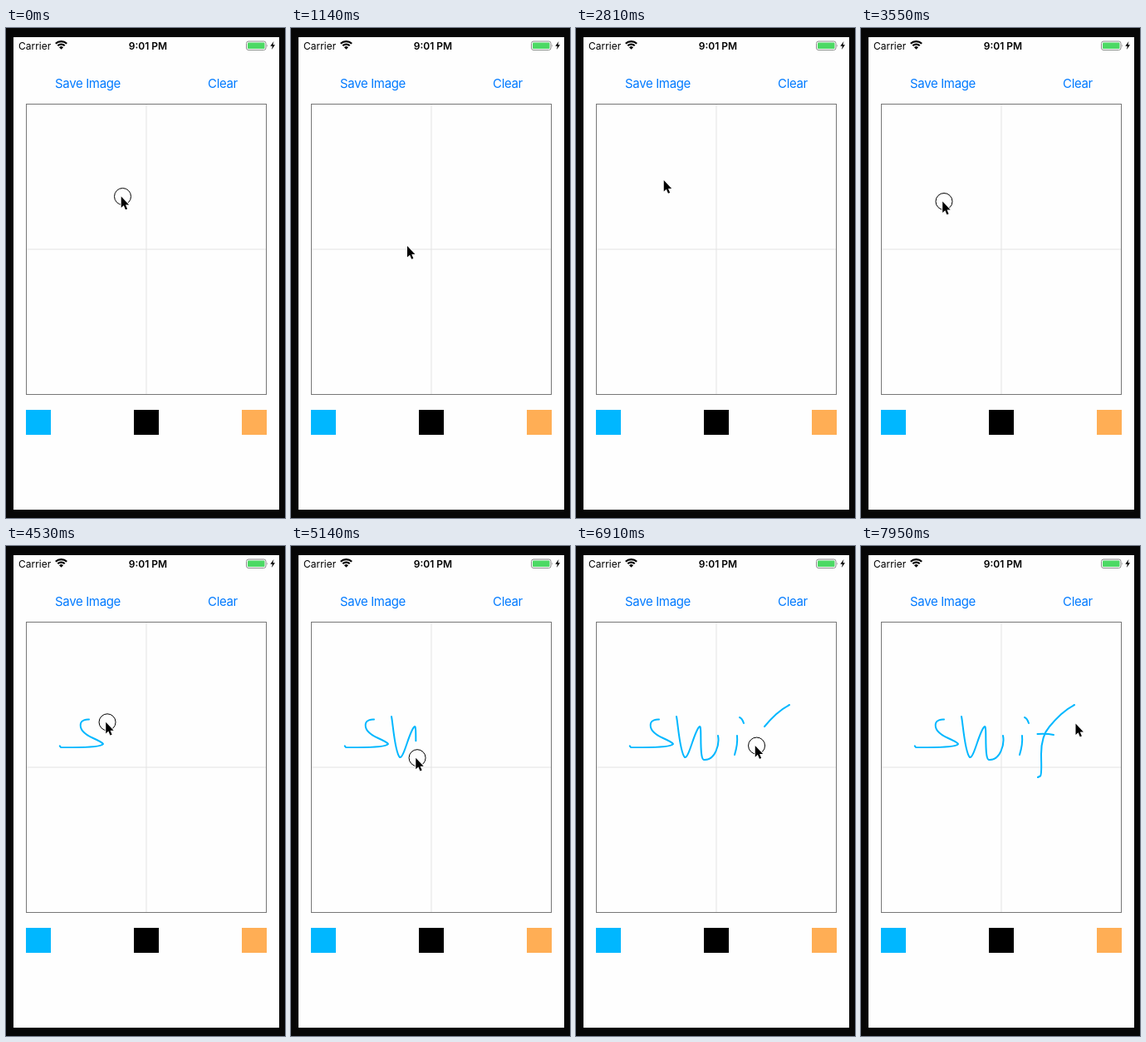
Recreate the animation shown at these times as an HTML page. Size 336 px wide and 589 px high, loop 8 s.

```html
<!DOCTYPE html>
<html lang="en">
<head>
<meta charset="utf-8">
<title>Drawing pad</title>
<style>
  html, body { margin: 0; width: 100%; height: 100%; overflow: hidden; background: #060606; }
  svg { display: block; width: 336px; height: 589px; font-family: Inter, Roboto, sans-serif; }
  .status { font-size: 12px; }
  .button { font-size: 15px; letter-spacing: -.35px; fill: #007aff; text-anchor: middle; }
  .ink { fill: none; stroke: #00b7ff; stroke-width: 2; stroke-linecap: round; stroke-linejoin: round; }
</style>
</head>
<body>
<svg viewBox="0 0 336 589">
  <rect width="336" height="589" fill="#060606"/>
  <rect x="9" y="11" width="320" height="568" fill="#fefefe"/>

  <g class="status">
    <text x="15" y="25.5">Carrier</text>
    <text x="171" y="25.5" font-weight="600" text-anchor="middle">9:01 PM</text>
    <path d="M59.8 18.8A9.5 9.5 0 0 1 73.2 18.8M62.3 21.3A6 6 0 0 1 70.7 21.3" fill="none" stroke="#000" stroke-width="2.2"/>
    <path d="M66.5 25.8L64 23.2A3.5 3.5 0 0 1 69 23.2Z"/>
    <rect x="289.5" y="16" width="23.5" height="10.5" rx="2.5" fill="none" stroke="#8c8c8c"/>
    <rect x="291" y="17.5" width="20.5" height="7.5" rx="1" fill="#4cd964"/>
    <path d="M314.3 19.5Q316 21.2 314.3 23Z" fill="#8c8c8c"/>
    <path d="M322.5 16L318.3 21.8H320.9L319.8 26L324 20.2H321.4Z"/>
  </g>

  <text class="button" x="98.5" y="71.5">Save Image</text>
  <text class="button" x="261" y="71.5">Clear</text>

  <path d="M169 92V440M25 266H313" stroke="#e3e3e3" fill="none"/>
  <rect x="24.5" y="91.5" width="289" height="349" fill="none" stroke="#777"/>
  <rect x="24" y="459" width="30" height="30" fill="#00b7ff"/>
  <rect x="154" y="459" width="30" height="30"/>
  <rect x="284" y="459" width="30" height="30" fill="#ffae55"/>

  <g class="ink">
    <path d="M100 208.5C96 208 91 210 90 213C88 221 96 227 105 231S116 236 117 238C115 241.5 95 242.5 66 242L64.8 240.3"/>
    <path d="M121 205C123 215 125 248 131 254C136 256 143 220 149 217C152 216 148 256 154 257C168 258 173 238 171 228"/>
    <path d="M194 228Q195 238 191 251"/>
    <path d="M197 206Q200 207 202 213"/>
    <path d="M257 191C247 196 236 206 227 217C219 226 217 238 217 250S218 274 216 276.5L213 278"/>
    <path d="M212.5 226Q223 225 232 227"/>
  </g>

  <circle id="ring" r="10" fill="none" stroke="#000"/>
  <g id="arrow" stroke-linejoin="round">
    <path d="M0 0V13.6L3.1 10.8L5.2 15.8L7.4 14.9L5.3 10H9.4Z" stroke="#fff" stroke-width="1.8" paint-order="stroke"/>
  </g>
</svg>
<script>
  const LOOP = 8000;
  const ring = document.getElementById('ring');
  const arrow = document.getElementById('arrow');
  const strokes = [...document.querySelectorAll('.ink path')];
  const lengths = strokes.map(s => s.getTotalLength());
  const poses = [];
  let stroke = -1;

  const spread = (n, fn) => Array.from({ length: n }, (_, i) => fn(n > 1 ? i / (n - 1) : 0));
  const mix = (a, b, u) => a + (b - a) * u;

  // Hover in n steps along a line of points.
  const glide = (n, ...pts) => spread(n, u => {
    const at = u * (pts.length - 1);
    const i = Math.floor(at);
    const a = pts[i], b = pts[i + 1] || a;
    return { x: mix(a[0], b[0], at - i), y: mix(a[1], b[1], at - i), ink: 1, stroke };
  });

  const press = (x, y) => [{ x, y, down: true, ink: 1, stroke }];

  // Draw the next stroke; ink trails the pen by one step until the end.
  function draw(n, from, to = 1) {
    let last = 0;
    stroke++;
    return spread(n, u => {
      const share = mix(from, to, u);
      const { x, y } = strokes[stroke].getPointAtLength(share * lengths[stroke]);
      const ink = share === 1 ? 1 : last;
      last = share;
      return { x, y, down: true, ink, stroke };
    });
  }

  // Screen refreshes fall on whole hundredths of a second.
  function move(start, end, ...parts) {
    const steps = parts.flat();
    const gap = (end - start) / Math.max(1, steps.length - 1);
    steps.forEach((step, i) => {
      const time = Math.ceil((start + i * gap) / 10 - 1e-6) * 10;
      poses.push({ time, ...step });
    });
  }

  move(0, 0, press(140.5, 202.5));
  move(80, 250, glide(3, [140, 222], [141, 245.5]));
  move(430, 430, glide(1, [140.5, 246]));
  move(1140, 1650, glide(7, [140, 262], [88, 530], [41, 480]));
  move(1920, 2280, glide(1, [40.5, 480]), press(42.5, 480), glide(3, [55, 440], [118, 166]));
  move(2450, 2540, glide(2, [117, 166], [116, 165]));
  move(2720, 3470, glide(5, [114, 168], [81, 228]), glide(5, [84, 242], [98.5, 209]));
  move(3550, 4350, draw(6, 0), glide(4, [66, 241], [117, 206]));
  move(4440, 5230, glide(1, [119, 205]), draw(9, .04));
  move(5490, 6290, glide(3, [172, 228], [192, 228]), draw(3, .25), glide(3, [192, 240], [195, 206]), draw(1, 1));
  move(6380, 7170, glide(4, [202, 208], [256, 191]), draw(4, .14, .86), glide(2, [212, 275], [209, 244]));
  move(7260, 7340, glide(2, [210, 230], [210, 226]));
  move(7520, 7950, draw(2, .4), glide(4, [236, 226], [258.5, 213.5]));

  function show({ x, y, down, ink, stroke }) {
    ring.style.display = down ? '' : 'none';
    ring.setAttribute('cx', x);
    ring.setAttribute('cy', y);
    arrow.setAttribute('transform', `translate(${down ? x - 1.8 : x} ${y})`);
    strokes.forEach((path, i) => {
      const share = i < stroke ? 1 : i === stroke ? ink : 0;
      path.style.display = share ? '' : 'none';
      path.style.strokeDasharray = share < 1 ? `${share * lengths[i]} 999` : 'none';
    });
  }

  let shown;
  function tick() {
    const t = performance.now() % LOOP;
    const pose = poses.findLast(p => p.time <= t);
    if (pose !== shown) show(shown = pose);
    requestAnimationFrame(tick);
  }
  tick();
</script>
</body>
</html>
```
